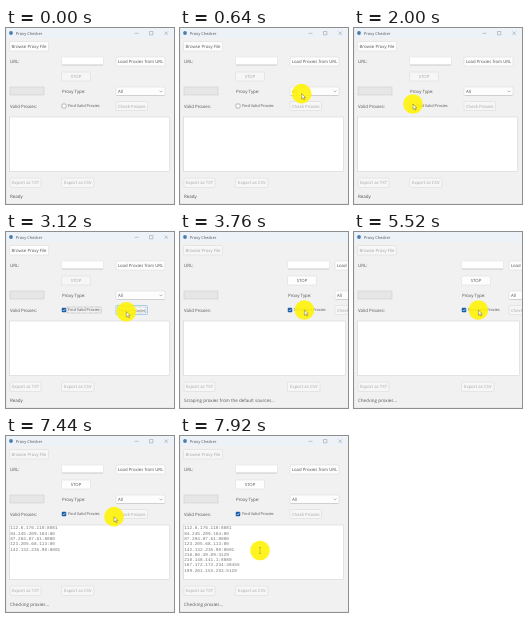
An HTML page that plays this animation: 168x176 px, repeating every 8 s.

```html
<!DOCTYPE html>
<html lang="en">
<head>
<meta charset="utf-8">
<title>Proxy Checker</title>
<style>
  html, body { margin: 0; width: 100%; height: 100%; overflow: hidden; background: #f1f1f1; }
  svg { display: block; width: 100%; height: 100%; }
  text { font-family: "Open Sans", "Noto Sans", sans-serif; text-rendering: geometricPrecision; white-space: pre; }
  .mono { font-family: "Liberation Mono", monospace; }
</style>
</head>
<body>
<svg id="stage" viewBox="0 0 168 176"></svg>
<script>
const LOOP = 8000, STEP = 80;
const INK = '#555', DIM = '#a6a6a6', BLUE = '#4fa8e0';
const stage = document.getElementById('stage');

// Pointer path: time, x, y
const path = [
  [0, 132, 77], [480, 132, 77], [560, 134, 77], [800, 97, 43],
  [1360, 97, 43], [1440, 85, 52], [1600, 70, 69],
  [1680, 70, 69], [1760, 71, 67], [2000, 59, 76],
  [2880, 59, 76], [2960, 72, 79], [3040, 97, 84], [3120, 120.3, 79.7],
  [3280, 120.3, 79.7], [3600, 124.4, 78],
  [6960, 124.4, 78], [7040, 124.4, 73], [7200, 124, 77],
  [7280, 124, 77], [7360, 128, 77], [7600, 68, 88],
  [7680, 68, 88], [7840, 80, 119], [7920, 80, 114.5], [8000, 80, 114.5]
];

const results = [
  '112.6.176.110:8081', '84.245.209.104:80', '87.204.87.61:8080',
  '123.205.68.113:80', '142.132.235.90:8001', '216.80.39.89:3129',
  '210.148.141.1:8080', '167.172.172.234:38455', '199.201.153.253:5120'
];

function pointerAt(t) {
  const i = path.findIndex(p => p[0] > t);
  const [t0, x0, y0] = path[i - 1], [t1, x1, y1] = path[i];
  const k = (t - t0) / (t1 - t0);
  return [x0 + (x1 - x0) * k, y0 + (y1 - y0) * k];
}

const rect = (x, y, w, h, fill, stroke = 'none', extra = '') =>
  `<rect x="${x}" y="${y}" width="${w}" height="${h}" fill="${fill}" stroke="${stroke}" stroke-width=".5" ${extra}/>`;
const line = (d, color, width = .5, extra = '') =>
  `<path d="${d}" fill="none" stroke="${color}" stroke-width="${width}" ${extra}/>`;
const text = (x, y, s, color = INK, size = 4.4, extra = '') =>
  `<text x="${x}" y="${y}" font-size="${size}" fill="${color}" ${extra}>${s}</text>`;

function button(x, y, w, h, label, enabled, focused = false) {
  return rect(x, y, w, h, enabled ? '#fdfdfd' : '#f6f6f6', focused ? BLUE : '#d6d6d6', 'rx="1"') +
    text(x + w / 2, y + h / 2 + 1.5, label, enabled ? INK : DIM, 4.3, 'text-anchor="middle"') +
    (focused ? rect(x + 1.5, y + 1.5, w - 3, h - 3, 'none', '#555', 'stroke-dasharray=".6 .6"') : '');
}

function titleBar(wide) {
  return rect(0, 0, 168, 10, '#ecf2f8') +
    '<circle cx="5" cy="5" r="1.9" fill="#4a7eb0"/>' +
    text(9.8, 6.5, 'Proxy Checker', INK, 4) +
    (wide ? '' : line('M128.5 5.3h4M143.5 3.5h3.4v3.4h-3.4zM158.5 3.5l3.4 3.4m0-3.4l-3.4 3.4', '#888', .45));
}

function checkbox(x, checked, focused) {
  return rect(x, 76, 4, 4, checked ? '#1c5fa8' : '#fff', checked ? '#1c5fa8' : '#777', 'rx=".6"') +
    (checked ? line(`M${x + .8} 78l.9 1 1.6-1.9`, '#fff', .6) : '') +
    text(x + 6, 79.4, 'Find Valid Proxies', INK, 3.9) +
    (focused ? rect(x + 5.2, 75, 34, 6, 'none', '#777', 'stroke-dasharray=".6 .6"') : '');
}

function pointer(t) {
  const [x, y] = pointerAt(t);
  const shown = t < 160 ? 0 : t < 240 ? .5 : 1;
  const pressed = t === 2160 || t === 3360;
  const overText = y > 87 && x < 110;
  const shape = overText
    ? line('M-1.2-3h2.4M0-3v6M-1.2 3h2.4', '#a89a30', .5)
    : '<path d="M0 0v5.4l1.3-1.2.9 2 .9-.4-.9-1.9h1.7z" fill="#fff" stroke="#554d10" stroke-width=".4"/>';
  return `<g opacity="${shown}"><circle cx="${x}" cy="${y}" r="${pressed ? 10.6 : 9.8}" fill="#fff200" opacity=".88"/>` +
    `<g transform="translate(${x} ${y})">${shape}</g></g>`;
}

function render(t) {
  const wide = t >= 3520 && t < 5600;
  const running = t >= 3440;
  const checked = t >= 2240;
  const ready = t >= 2560 && !running;
  const mid = wide ? 107.5 : 55.5;
  const right = wide ? 155 : 110;
  const status = !running ? 'Ready'
    : t < 5520 && wide ? 'Scraping proxies from the default sources...' : 'Checking proxies...';
  const lines = t < 6960 ? [] : t < 7360 ? ['119.166.202.228:9091']
    : results.slice(0, Math.min(9, 3 + 2 * (t - 7360) / STEP));

  stage.innerHTML =
    rect(0, 0, 168, 176, '#f1f1f1') + titleBar(wide) +
    button(3.5, 13.5, 39, 9.5, 'Browse Proxy File', !running) +
    text(4, 34.8, 'URL:') +
    rect(mid, 29, 42, 8, '#fff', '#dcdcdc', 'rx=".8"') +
    line(`M${mid + .5} 37h41`, '#aaa') +
    button(right, 29, 49, 9, 'Load Proxies from URL', true) +
    button(mid, 44, 29, 9, 'STOP', running) +
    rect(4, 59, 34, 8, '#e6e6e6', '#c6c6c6') +
    text(mid + .5, 65, 'Proxy Type:') +
    rect(right, 59, 49, 8.5, '#fdfdfd', '#d4d4d4', 'rx=".8"') +
    line(`M${right + .5} 67.5h48`, '#b8b8b8') +
    text(right + 2, 64.9, 'All') +
    line(`M${right + 43.5} 62.6l1.5 1.5 1.5-1.5`, '#777') +
    text(4, 79.6, 'Valid Proxies:') +
    checkbox(mid + .5, checked, checked && t < 3200) +
    button(right, 73.5, 31.5, 9, 'Check Proxies', ready, ready && t >= 3120) +
    rect(3.7, 89, wide ? 162 : 159.8, 54.6, '#fff', '#cdcdcd') +
    lines.map((s, i) => text(4.2, 93.3 + i * 5.3, s, '#777', 4.4, 'class="mono"')).join('') +
    button(4, 150, 31, 9.5, 'Export as TXT', false) +
    button(mid, 150, 32.5, 9.5, 'Export as CSV', false) +
    text(4, 170.3, status, INK, 4.5) +
    line('M0 175.8h168M.1 0v176', '#d2d6da', .4) +
    pointer(t);
}

let last = -1;
function tick(now) {
  const t = Math.floor(now % LOOP / STEP) * STEP;
  if (t !== last) render(last = t);
  requestAnimationFrame(tick);
}
tick(performance.now());
</script>
</body>
</html>
```
